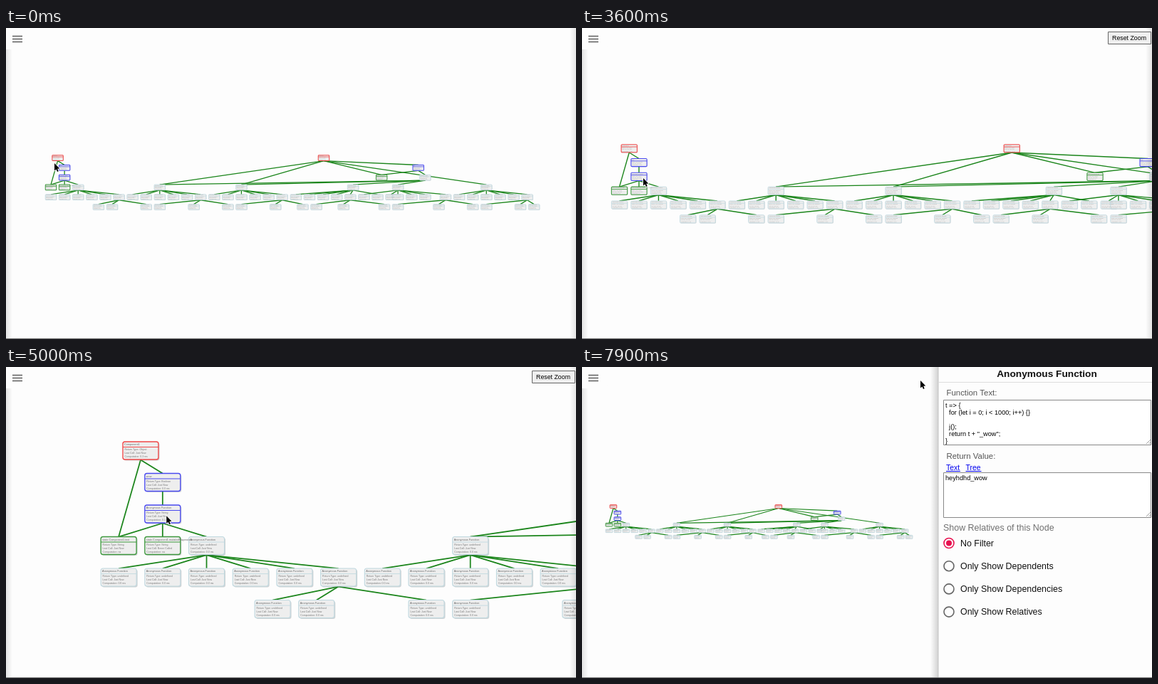
Animation, 800 px wide and 437 px high, one loop 8000 ms. Source, as an HTML page with a canvas:

```html
<!DOCTYPE html>
<html lang="en">
<head>
<meta charset="utf-8">
<title>Call graph</title>
<style>
html, body { margin: 0; width: 100%; height: 100%; overflow: hidden; background: #fdfdfd; }
canvas { display: block; width: 800px; height: 437px; }
</style>
</head>
<body>
<canvas id="stage" width="800" height="437"></canvas>
<script>
const ctx = document.getElementById('stage').getContext('2d');
const LOOP = 8000, FULL = 61.7, ROW = 0.7215;
const SANS = '"Liberation Sans", Arial, sans-serif';
const SERIF = '"Liberation Serif", "Times New Roman", serif';
const RED = '#f04848', BLUE = '#4a4af0', GREEN = '#3f993f', PALE = '#c0d9e0';
const PANEL_AT = 5907, RESET_AT = 7100;

// Graph: columns and rows are grid units
const nodes = [], edges = [];
function add(col, row, color = PALE, title = 'Anonymous Function', type = 'undefined', call = 'Just Now', cost = '0.0 ms') {
  const node = { col, row, color, title, lines: ['Return Type: ' + type, 'Last Call: ' + call, 'Computation: ' + cost] };
  nodes.push(node);
  return node;
}
const link = (from, ...targets) => targets.forEach(to => edges.push([from, to]));
const run = first => [0, 1, 2, 3, 4, 5].map(i => first + i);

const root1 = add(0.5, 0, RED, 'Component1', 'Object', 'Just Now', '0.3 ms');
const root2 = add(20.05, 0, RED, 'Component2', 'Object', 'Just Now', '0.4 ms');
const flag1 = add(1, 1, BLUE, 'wow', 'Boolean');
const flag2 = add(27, 1, BLUE, 'wow', 'Boolean');
const text1 = add(1, 2, BLUE, 'Anonymous Function', 'String', 'Just Now', '0.1 ms');
const state2 = add(24.3, 2, GREEN, 'state.Component2.list', 'Object', 'Just Now', 'na');
const map2 = add(27.5, 2);
const stateA = add(0, 3, GREEN, 'state.Component1.text', 'String', 'Just Now', 'na');
const stateB = add(1, 3, GREEN, 'state.Component1.mutatedPlayerarea', 'String', 'Never Called', 'na');

const groups = [
  [2, run(0), [3.5, 4.5, 7]],
  [8, run(6), [8, 10.5, 13]],
  [14, run(12), [14, 16.5, 18.5]],
  [22.2, [18, 19, 20, 21, 24, 22], [19.5, 21.5, 24.5]],
  [25.5, [23, 25, 25.5, 26.5, 27.5, 29], [25.5, 28.5, 31]],
  [32, run(30), [32, 34.5, 35.5]]
].map(([col, kids, leaves]) => {
  const top = add(col, 3);
  const row = kids.map(c => add(c, 4));
  link(top, ...row);
  link(row[5], ...leaves.map(c => add(c, 5)));
  return top;
});
link(root1, stateA, flag1);
link(flag1, text1);
link(text1, stateA, stateB, groups[0]);
link(root2, groups[1], groups[2], state2, flag2, groups[5]);
link(flag2, state2, map2);
link(map2, ...groups.slice(1, 5));

// Motion
const clamp = v => Math.max(0, Math.min(1, v));
const span = (t, a, b) => clamp((t - a) / (b - a));
const mix = (a, b, p) => a + (b - a) * p;
const smooth = p => p * p * (3 - 2 * p);
const cubic = p => p < 0.5 ? 4 * p ** 3 : 1 - 4 * (1 - p) ** 3;

const FIT = { x: 63, y: 182.6, s: 19.1 };
const NEAR = { x: 9.5, y: 114.6, s: FULL };
const PANNED = { x: 158.1, y: 117.5, s: FULL };
const NARROW = { x: 38, y: 196, s: 11.86 };

// Geometric zoom around a fixed point
function zoom(a, b, p) {
  const s = a.s * (b.s / a.s) ** p;
  const q = (s - a.s) / (b.s - a.s);
  return { x: mix(a.x, b.x, q), y: mix(a.y, b.y, q), s };
}

function viewAt(t) {
  if (t < 4200) return zoom(FIT, NEAR, span(t, 3350, 4160));
  if (t < RESET_AT) {
    const p = 0.591 * span(t, 4280, 4600) + 0.409 * span(t, 4600, 4820);
    return { x: mix(NEAR.x, PANNED.x, p), y: mix(NEAR.y, PANNED.y, p), s: FULL };
  }
  return zoom(PANNED, NARROW, cubic(span(t, RESET_AT, 7850)));
}

const path = [
  [100, 68, 190], [600, 250, 168], [1200, 446, 180], [1900, 446, 180], [2250, 82, 208],
  [2800, 82, 208], [2900, 90, 209], [3200, 86, 211], [4160, 86, 211], [4280, 162, 209],
  [4600, 250, 209], [4820, 310, 211], [5050, 214, 209], [6350, 214, 209], [6850, 470, 13],
  [7350, 468, 13], [7600, 548, 30], [7700, 519, 26], [7900, 475, 19]
];
function pointerAt(t) {
  const i = path.findIndex(k => k[0] > t);
  if (i === 0) return path[0].slice(1);
  if (i < 0) return path[path.length - 1].slice(1);
  const a = path[i - 1], b = path[i], p = smooth(span(t, a[0], b[0]));
  return [mix(a[1], b[1], p), mix(a[2], b[2], p)];
}

const hovers = [
  { node: root2, from: 1150, tip: 1700, to: 1930, info: ['Component2', '0.4 ms', 'Object', 5, 0] },
  { node: text1, from: 2230, tip: 2400, to: 2830, info: ['Anonymous Function', '0.1 ms', 'String', 3, 1] },
  { node: text1, from: 5040, tip: 5080, to: 6400, info: ['Anonymous Function', '0.1 ms', 'String', 3, 1] }
];

// Drawing helpers
function text(str, x, y, font, color = '#111', align = 'left') {
  ctx.font = font;
  ctx.fillStyle = color;
  ctx.textAlign = align;
  ctx.fillText(str, x, y);
}
function line(x1, y1, x2, y2, color, width = 1) {
  ctx.strokeStyle = color;
  ctx.lineWidth = width;
  ctx.beginPath();
  ctx.moveTo(x1, y1);
  ctx.lineTo(x2, y2);
  ctx.stroke();
}
function box(x, y, w, h, r, fill, stroke, width = 1) {
  ctx.beginPath();
  ctx.roundRect(x, y, w, h, r);
  if (fill) { ctx.fillStyle = fill; ctx.fill(); }
  if (stroke) { ctx.strokeStyle = stroke; ctx.lineWidth = width; ctx.stroke(); }
}
function fade(x, w, from, to) {
  const g = ctx.createLinearGradient(x, 0, x + w, 0);
  g.addColorStop(0, from);
  g.addColorStop(1, to);
  ctx.fillStyle = g;
  ctx.fillRect(x, 0, w, 437);
}
function shape(points, fill, stroke, width = 1) {
  ctx.beginPath();
  points.forEach(([x, y], i) => i ? ctx.lineTo(x, y) : ctx.moveTo(x, y));
  ctx.closePath();
  ctx.lineJoin = 'round';
  ctx.strokeStyle = stroke;
  ctx.lineWidth = width;
  ctx.stroke();
  ctx.fillStyle = fill;
  ctx.fill();
}

const place = (n, v) => [v.x + n.col * v.s, v.y + n.row * v.s * ROW];

// Runs paint in the local space of every node on the stage
function eachNode(v, paint) {
  const k = v.s / FULL;
  for (const n of nodes) {
    const [x, y] = place(n, v);
    if (x < -60 || x > 860) continue;
    ctx.save();
    ctx.translate(x, y);
    ctx.scale(k, k);
    paint(n);
    ctx.restore();
  }
}

function drawGraph(v, hovered) {
  const k = v.s / FULL;
  for (const [a, b] of edges) {
    const [ax, ay] = place(a, v), [bx, by] = place(b, v);
    line(ax, ay + 13 * k, bx, by - 12.5 * k, '#1b851b', 1.1 + 0.65 * k);
  }
  eachNode(v, n => {
    const w = (0.85 + 0.5 * k) / k * (n.color === PALE ? 0.8 : 1);
    box(-23.5, -11, 50, 25, 3, 'rgba(90,100,110,.28)');
    box(-25, -12.5, 50, 25, 3, n === hovered ? '#cfcfd6' : '#eee', n.color, w);
    line(-25, -5, 25, -5, n.color, w * 0.8);
  });
  eachNode(v, n => {
    ctx.globalAlpha = 0.35 + 0.65 * k;
    text(n.title, -23, -7.2, '3.8px ' + SANS, '#666');
    n.lines.forEach((s, i) => text(s, -22.5, -0.4 + i * 5, '3.5px ' + SANS, '#777'));
  });
}

function drawTooltip({ node, info }, v) {
  const [nx, ny] = place(node, v);
  const x = nx + 25 * v.s / FULL + 8.5, y = ny - 54.5;
  const [title, cost, type, deps, users] = info;
  box(x + 1, y + 1, 207, 110, 9, 'rgba(0,0,0,.15)');
  box(x, y, 206.5, 110, 9, '#fff', '#666', 1.5);
  shape([[x + 1, ny - 5], [x - 6, ny], [x + 1, ny + 5]], '#777', '#777', 0.5);
  text(title, x + 103, y + 16.5, 'bold 13.8px ' + SERIF, '#000', 'center');
  line(x + 1, y + 25.5, x + 205, y + 25.5, '#ddd');
  const rows = [['Computation Took: ', cost], ['Last Call: ', 'Just Now'], ['Return Type: ', type],
    ['Dependencies: ', deps], ['Dependents: ', users]];
  rows.forEach(([label, value], i) => {
    const by = y + 38.5 + i * 15.3;
    text(label, x + 7.5, by, '11.5px ' + SERIF, '#000');
    const w = ctx.measureText(label).width;
    text(value, x + 7.5 + w, by, 'bold 11.5px ' + SERIF, '#000');
  });
}

function drawArea(y, h, lines) {
  box(7.5, y + 0.5, 291, h, 0, '#fff', '#888');
  lines.forEach((s, i) => text(s, 10, y + 11 + i * 10, '9.2px ' + SANS, '#000'));
  line(292, y + h - 1, 298, y + h - 7, '#888', 0.8);
  line(295.5, y + h - 1, 298, y + h - 3.5, '#888', 0.8);
}

function drawPanel(x) {
  fade(x - 11, 11, 'rgba(0,0,0,0)', 'rgba(0,0,0,.17)');
  ctx.save();
  ctx.translate(x, 0);
  ctx.fillStyle = '#fdfdfd';
  ctx.fillRect(0, 0, 300, 437);
  line(0, 0, 0, 437, '#c4c4c4');
  text('Anonymous Function', 152.5, 14, 'bold 13.7px ' + SANS, '#111', 'center');
  line(0, 21.5, 300, 21.5, '#ddd');
  text('Function Text:', 11.5, 40, '11.4px ' + SANS, '#555');
  drawArea(46, 63, ['t => {', '  for (let i = 0; i < 1000; i++) {}', '', '  j();', '  return t + "_wow";', '}']);
  text('Return Value:', 11.5, 129, '11.4px ' + SANS, '#555');
  for (const [s, lx, w] of [['Text', 11, 20], ['Tree', 38.5, 22]]) {
    text(s, lx, 145, '10.4px ' + SANS, '#00e');
    line(lx, 146.5, lx + w, 146.5, '#00e');
  }
  drawArea(148, 63, ['heyhdhd_wow']);
  text('Show Relatives of this Node', 7, 229.5, '12.45px ' + SANS, '#707070');
  ['No Filter', 'Only Show Dependents', 'Only Show Dependencies', 'Only Show Relatives'].forEach((s, i) => {
    const y = 247.5 + i * 32.2;
    ctx.beginPath();
    ctx.arc(15, y, 7, 0, 7);
    ctx.strokeStyle = i ? '#666' : '#e8104f';
    ctx.lineWidth = 1.6;
    ctx.stroke();
    if (!i) {
      ctx.beginPath();
      ctx.arc(15, y, 4, 0, 7);
      ctx.fillStyle = '#e8104f';
      ctx.fill();
    }
    text(s, 31, y + 4.3, '12.45px ' + SANS);
  });
  ctx.restore();
}

function drawPointer([x, y], hand) {
  ctx.save();
  ctx.translate(x, y);
  if (hand) {
    shape([[-1, 0.5], [0.5, 0], [1.5, 1], [1.8, 4.5], [4, 4.8], [6.5, 5.5], [7.5, 7], [7, 10.5], [5.5, 13],
      [0.5, 13], [-1.5, 10], [-4, 7.5], [-3, 6.5], [-0.7, 8]], '#fff', '#111', 1.6);
    for (const lx of [1.4, 3.1, 4.8]) line(lx, 8, lx, 11, '#333', 0.6);
  } else {
    shape([[0, 0], [0, 10.5], [2.4, 8.4], [4, 12], [5.7, 11.2], [4.2, 7.7], [7.3, 7.5]], '#000', '#fff', 1.6);
  }
  ctx.restore();
}

function draw(t) {
  const open = t >= PANEL_AT;
  const width = open ? 500 : 800;
  const view = viewAt(t);
  const hover = hovers.find(h => t >= h.from && t < h.to);

  ctx.fillStyle = '#fdfdfd';
  ctx.fillRect(0, 0, 800, 437);
  ctx.save();
  ctx.beginPath();
  ctx.rect(0, 0, width, 437);
  ctx.clip();
  drawGraph(view, hover && hover.node);
  ctx.restore();

  fade(0, 9, 'rgba(0,0,0,.1)', 'rgba(0,0,0,0)');
  fade(791, 9, 'rgba(0,0,0,0)', 'rgba(0,0,0,.1)');
  box(-10, -10, 48, 40, 9, '#fdfdfd');
  for (const y of [11.5, 15.5, 19.5]) line(9, y, 23, y, '#555', 1.4);

  if (t >= 3380 && t < RESET_AT) {
    const x = open ? 431.5 : 738.5;
    box(x, 5.5, 60, 17, 0, '#efefef', '#666');
    text('Reset Zoom', x + 29.5, 17, '8.8px ' + SANS, '#000', 'center');
  }
  if (hover && t >= hover.tip) drawTooltip(hover, view);
  if (open) {
    const p = 1 - (1 - span(t, PANEL_AT, PANEL_AT + 225)) ** 3;
    drawPanel(800 - 300 * p);
  }
  line(0, 436.5, 800, 436.5, '#777');
  drawPointer(pointerAt(t), !!hover);
}

const start = performance.now();
function tick() {
  draw((performance.now() - start) % LOOP);
  requestAnimationFrame(tick);
}
tick();
</script>
</body>
</html>
```
